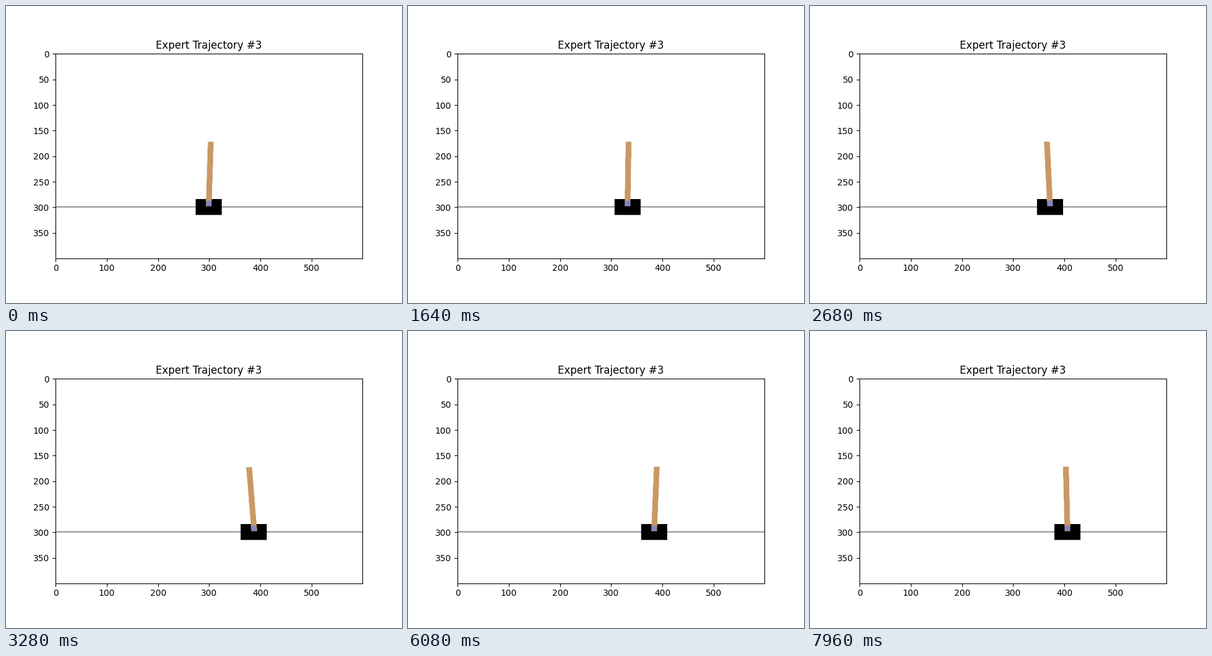
A matplotlib script that plays this animation: 640x480 px, repeating every 8000 ms.

```python
import numpy as np
import matplotlib.pyplot as plt
from matplotlib.animation import FuncAnimation

WIDTH, HEIGHT = 600, 400
FRAMES, INTERVAL = 200, 40

CART_Y, CART_W, CART_H = 100, 50, 30
POLE_W, POLE_LEN = 10, 125
AXLE_Y = CART_Y + CART_H / 4

BLACK = (0, 0, 0)
POLE_COLOR = (202, 152, 101)
AXLE_COLOR = (129, 132, 203)

# Physics: gravity, time step, pixels per metre, pole inertia factor
GRAVITY, STEP, SCALE, INERTIA = 9.8, 0.02, 125, 2 / 3
FIRST_LEAN, LAST_LEAN = 0.034, -0.027

# Turning points of the ride: (step, left edge of the cart)
CART_KEYS = [
    (0, 274.5), (6, 270.4), (13, 271.9), (28, 285.5), (42, 309.4),
    (63, 342.5), (84, 363.9), (92, 366.3), (104, 363.2), (112, 361.6),
    (120, 361.1), (132, 357.9), (146, 357.5), (152, 359.4), (166, 369.5),
    (182, 378.2), (188, 377.7), (199, 381.5),
]


def smooth(keys):
    """Cubic Hermite curve through the keys, sampled once per frame."""
    t, v = np.array(keys).T
    slope = np.gradient(v, t)
    n = np.arange(FRAMES)
    i = np.clip(np.searchsorted(t, n, side="right") - 1, 0, len(t) - 2)
    h = t[i + 1] - t[i]
    s = (n - t[i]) / h
    return ((1 + 2 * s) * (1 - s) ** 2 * v[i]
            + s * (1 - s) ** 2 * h * slope[i]
            + s ** 2 * (3 - 2 * s) * v[i + 1]
            + s ** 2 * (s - 1) * h * slope[i + 1])


def balanced_lean(cart):
    """Lean that keeps the pole up: INERTIA * lean'' = g * lean - cart''."""
    second = np.eye(FRAMES, k=1) - 2 * np.eye(FRAMES) + np.eye(FRAMES, k=-1)
    system = INERTIA * second - GRAVITY * STEP ** 2 * np.eye(FRAMES)
    push = -second @ cart / SCALE
    for end, value in ((0, FIRST_LEAN), (-1, LAST_LEAN)):
        system[end] = 0
        system[end, end] = 1
        push[end] = value
    return np.linalg.solve(system, push)


cart_left = smooth(CART_KEYS)
lean = balanced_lean(cart_left)
cols = np.arange(WIDTH)[None, :]
rows = np.arange(HEIGHT)[:, None]


def paint(canvas, coverage, color):
    canvas += coverage[..., None] * (np.array(color) - canvas)


def polygon_coverage(points):
    """Scanline fill of a convex polygon on whole-pixel corners, soft sides."""
    points = np.floor(points)
    left = np.full((HEIGHT, 1), np.inf)
    right = -left
    for (x1, y1), (x2, y2) in zip(points, np.roll(points, -1, axis=0)):
        if y1 == y2:
            continue
        inside = (rows >= min(y1, y2)) & (rows <= max(y1, y2))
        x = x1 + (rows - y1) * (x2 - x1) / (y2 - y1)
        left = np.where(inside, np.minimum(left, x), left)
        right = np.where(inside, np.maximum(right, x), right)
    solid = (cols >= np.round(left)) & (cols <= np.round(right))
    soft = np.clip(1 - np.maximum(left - cols, cols - right), 0, 1)
    return np.where(solid, 1.0, soft)


def box(left, right, bottom, top):
    return np.array([(left, bottom), (left, top), (right, top), (right, bottom)])


def render(n):
    canvas = np.full((HEIGHT, WIDTH, 3), 255.0)
    cart_x = cart_left[n] + CART_W / 2

    cart = box(-CART_W / 2, CART_W / 2, -CART_H / 2, CART_H / 2)
    paint(canvas, polygon_coverage(cart + (cart_x, CART_Y)), BLACK)

    c, s = np.cos(lean[n]), np.sin(lean[n])
    pole = box(-POLE_W / 2, POLE_W / 2, -POLE_W / 2, POLE_LEN - POLE_W / 2)
    pole = pole @ np.array([(c, -s), (s, c)])
    paint(canvas, polygon_coverage(pole + (cart_x, AXLE_Y)), POLE_COLOR)

    distance = np.hypot(cols - int(cart_x), rows - int(AXLE_Y))
    paint(canvas, np.clip(POLE_W / 2 + 1 - distance, 0, 1), AXLE_COLOR)

    canvas[CART_Y] = BLACK
    return canvas[::-1].round().astype(np.uint8)


fig, ax = plt.subplots(figsize=(6.4, 4.8), dpi=100)
ax.set_title("Expert Trajectory #3")
picture = ax.imshow(render(0))


def update(n):
    picture.set_data(render(n))
    return [picture]


anim = FuncAnimation(fig, update, frames=FRAMES, interval=INTERVAL,
                     repeat=True, repeat_delay=0)
plt.show()
```
